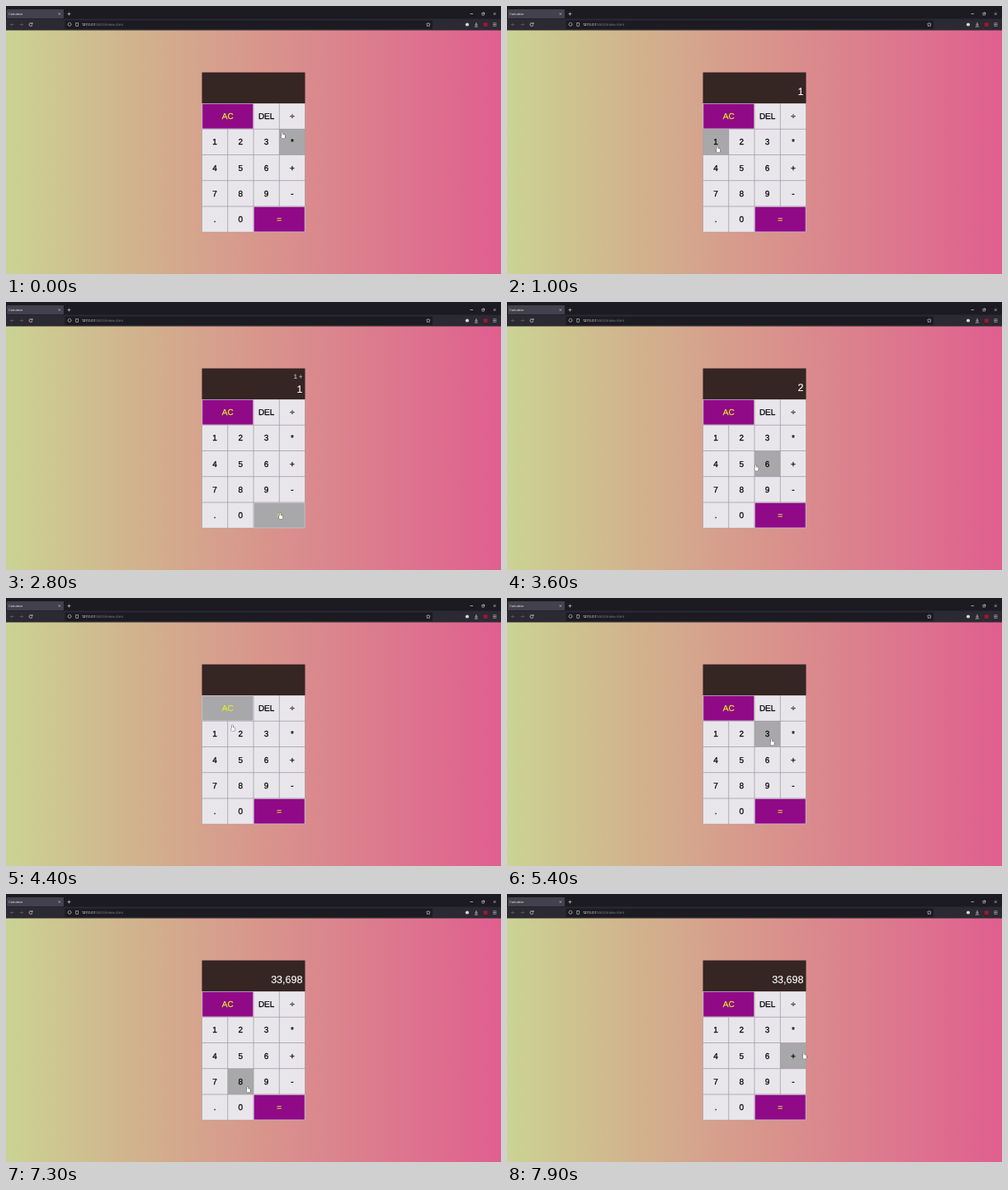
Animation of 600 by 325 pixels, one loop 8000 ms. Source, as an HTML page with a canvas:

```html
<!DOCTYPE html>
<html lang="en">
<head>
<meta charset="utf-8">
<title>Calculator</title>
<style>
html, body { margin: 0; width: 100%; height: 100%; overflow: hidden; }
canvas { display: block; width: 600px; height: 325px; }
</style>
</head>
<body>
<canvas id="stage" width="600" height="325"></canvas>
<script>
const ctx = document.getElementById('stage').getContext('2d');
const LOOP = 8000, STEP = 100;
// The page is a full-size browser window scaled down to the stage
const SCALE = 600 / 1920;
const LEFT = 760 * SCALE, CELL = 100 * SCALE, SCREEN = 120 * SCALE;
const TOP = 80.5, KEYS_TOP = TOP + SCREEN, PAGE_TOP = 29.5;
const UI = 'Inter, "Open Sans", sans-serif';
const ARIAL = '"Liberation Sans", Arial, sans-serif';

const keys = [];
['AADN÷', '123*', '456+', '789-', '.0=='].forEach((row, r) => {
  const labels = r ? [...row] : ['AC', 'AC', 'DEL', '÷'];
  labels.forEach((label, c) => {
    if (labels[c - 1] === label) return;
    const span = labels[c + 1] === label ? 2 : 1;
    keys.push({
      label, accent: span === 2,
      x: LEFT + c * CELL, y: KEYS_TOP + r * CELL, w: span * CELL
    });
  });
});

// Pointer stops, given as an offset from the middle of a key
function hover(time, label, dx = 3, dy = 9) {
  const key = keys.find(k => k.label === label);
  return { time, x: key.x + key.w / 2 + dx, y: key.y + CELL / 2 + dy };
}
const press = (time, label, dx, dy) => ({ ...hover(time, label, dx, dy), label });

const route = [
  hover(0, '*', -11, -8),
  press(1000, '1'),
  hover(1150, '+'),
  press(1400, '+'),
  hover(1900, '1', -15, 15),
  press(2200, '1'),
  hover(2800, '=', 2, 1),
  press(3000, '=', 2, 1),
  press(4200, 'AC'),
  hover(4400, '2', -9, -7),
  hover(5400, '3', 6, 10),
  press(5500, '3', 6, 10),
  press(5700, '3', 6, 10),
  press(6300, '6'),
  hover(6500, '9', -4, 11),
  press(6800, '9', -4, 11),
  press(7200, '8'),
  hover(7450, '9', -10, 11),
  hover(7900, '+', 14, 0)
];

function pointerAt(t) {
  const next = route.find(s => s.time > t);
  if (!next) return route[route.length - 1];
  const from = route[Math.max(0, route.indexOf(next) - 1)];
  const k = Math.max(0, (t - from.time) / (next.time - from.time));
  const ease = k * k * (3 - 2 * k);
  return {
    x: from.x + (next.x - from.x) * ease,
    y: from.y + (next.y - from.y) * ease
  };
}

function calculate(t) {
  let current = '', stored = '';
  for (const { time, label } of route) {
    if (!label || time > t) continue;
    if (label === 'AC') current = stored = '';
    else if (label === '+') [stored, current] = [current, ''];
    else if (label === '=') [current, stored] = [String(+stored + +current), ''];
    else current += label;
  }
  return {
    current: current && Number(current).toLocaleString('en'),
    previous: stored && `${stored} +`
  };
}

function rect(x, y, w, h, color) {
  ctx.fillStyle = color;
  ctx.fillRect(x, y, w, h);
}

// Size in page pixels; weight thickens the glyphs slightly
function text(str, x, y, size, color, align, family = ARIAL, weight = 0) {
  ctx.save();
  ctx.translate(x, y);
  ctx.scale(SCALE, SCALE);
  ctx.font = `${size}px ${family}`;
  ctx.textRendering = 'geometricPrecision';
  ctx.textAlign = align;
  ctx.fillStyle = ctx.strokeStyle = color;
  ctx.lineWidth = weight;
  ctx.lineJoin = 'round';
  ctx.fillText(str, 0, 0);
  if (weight) ctx.strokeText(str, 0, 0);
  const width = ctx.measureText(str).width * SCALE;
  ctx.restore();
  return width;
}

function line(color, width, ...points) {
  ctx.strokeStyle = color;
  ctx.lineWidth = width;
  ctx.beginPath();
  points.forEach(p => ctx.lineTo(...p));
  ctx.stroke();
}

function rounded(x, y, w, h, color) {
  ctx.fillStyle = color;
  ctx.beginPath();
  ctx.roundRect(x, y, w, h, 1);
  ctx.fill();
}

function cross(x, y, r, color) {
  for (const s of [-1, 1]) line(color, 0.6, [x - r, y - r * s], [x + r, y + r * s]);
}

function arc(x, y, r, from, to, color) {
  ctx.strokeStyle = color;
  ctx.lineWidth = 0.7;
  ctx.beginPath();
  ctx.arc(x, y, r, from, to);
  ctx.stroke();
}

function star(x, y, r, color) {
  const points = Array.from({ length: 11 }, (_, i) => {
    const a = -Math.PI / 2 + i * Math.PI / 5, d = i % 2 ? r * 0.5 : r;
    return [x + d * Math.cos(a), y + d * Math.sin(a)];
  });
  line(color, 0.6, ...points);
}

function drawTabs(ink) {
  rect(0, 0, 600, 16, '#1c1b22');
  rounded(1, 4, 69, 11, '#42414d');
  text('Calculator', 3, 10.9, 11.5, '#f4f4f6', 'left', UI);
  cross(64.8, 9.6, 1.2, ink);
  line(ink, 0.7, [74.4, 9.6], [78.4, 9.6]);
  line(ink, 0.7, [76.4, 7.6], [76.4, 11.6]);

  line(ink, 0.7, [562.5, 9.5], [566, 9.5]);
  ctx.lineWidth = 0.6;
  ctx.strokeRect(577, 8.6, 2.4, 2.4);
  line(ink, 0.5, [578, 8], [580, 8], [580, 10]);
  cross(592.3, 9.5, 1.5, ink);
}

function drawToolbar(ink, dim) {
  rect(0, 15.5, 600, PAGE_TOP - 15.5, '#2b2a33');
  for (const [x, s] of [[7.5, 1], [18.5, -1]]) {
    line(dim, 0.7, [x - 2, 22.5], [x + 2, 22.5]);
    line(dim, 0.7, [x - s * 0.3, 20.8], [x - s * 2, 22.5], [x - s * 0.3, 24.2]);
  }
  arc(30, 22.5, 2, 0.2, 5.4, ink);
  line(ink, 0.8, [32, 20], [32, 21.7], [30.3, 21.7]);

  rounded(71.5, 17.5, 445.5, 10.5, '#1c1b22');
  arc(77, 22.2, 2, -0.4, Math.PI + 0.4, ink);
  line(ink, 0.6, [75, 21.3], [77, 20], [79, 21.3]);
  ctx.strokeRect(84.8, 20.3, 2.8, 4.4);
  const host = text('127.0.0.1', 92, 24, 13.5, '#f4f4f6', 'left', UI);
  text(':5500/index.html', 92 + host, 24, 13.5, '#85848d', 'left', UI);
  star(511.8, 22.6, 2.5, ink);

  ctx.fillStyle = ink;
  ctx.beginPath();
  ctx.arc(559, 22.5, 2.1, 0, 7);
  ctx.fill();
  line(ink, 0.8, [570, 20], [570, 23.6]);
  line(ink, 0.7, [568.5, 22.2], [570, 23.7], [571.5, 22.2]);
  line(ink, 0.7, [567.8, 25], [572.2, 25]);
  rect(579, 20.3, 4.6, 4.6, '#a3152c');
  for (let i = -1; i <= 1; i++) {
    line(ink, 0.6, [590.2, 22.5 + i * 1.7], [594.5, 22.5 + i * 1.7]);
  }
}

function drawPage() {
  const g = ctx.createLinearGradient(0, 0, 600, 0);
  ['#cbd393', '#d1b48d', '#d8978c', '#dc7b8e', '#e05f8f'].forEach((color, i) =>
    g.addColorStop(i / 4, color));
  rect(0, PAGE_TOP - 1, 600, 326 - PAGE_TOP, g);
}

// Both lines share the free height of the screen evenly; empty ones take none
function drawScreen({ current, previous }) {
  rect(LEFT, TOP, 4 * CELL, SCREEN, '#352523');
  const pad = 10 * SCALE, right = LEFT + 4 * CELL - pad;
  const lines = [
    { str: previous, size: 24, color: '#d0cac8' },
    { str: current, size: 40, color: '#ffffff' }
  ];
  const height = l => l.str ? l.size * SCALE * 1.15 : 0;
  const free = SCREEN - 2 * pad - height(lines[0]) - height(lines[1]);
  let y = TOP + pad + free / 4;
  for (const l of lines) {
    text(l.str, right, y + l.size * SCALE * 0.92, l.size, l.color, 'right', ARIAL, 0.5);
    y += height(l) + free / 2;
  }
}

function drawKeys(pointer) {
  rect(LEFT, KEYS_TOP, 4 * CELL, 5 * CELL, '#a19ea5');
  for (const { label, accent, x, y, w } of keys) {
    const over = pointer.x >= x && pointer.x < x + w &&
      pointer.y >= y && pointer.y < y + CELL;
    const edge = accent ? 0.7 : 0.4;
    if (accent) rect(x, y, w, CELL, '#d2c6d6');
    rect(x + edge, y + edge, w - 2 * edge, CELL - 2 * edge,
      over ? '#a8a7a9' : accent ? '#900a88' : '#e8e6eb');
    text(label, x + w / 2, y + CELL / 2 + 3.5, 32,
      accent ? '#dcec2c' : '#080808', 'center', ARIAL, 0.9);
  }
}

function drawHand({ x, y }) {
  ctx.save();
  ctx.translate(x, y);
  ctx.beginPath();
  ctx.roundRect(-1.7, -3.8, 1.4, 5, 0.7);
  ctx.roundRect(-2.2, -0.8, 4.4, 4.3, 1.2);
  ctx.lineWidth = 1;
  ctx.strokeStyle = '#45434a';
  ctx.stroke();
  ctx.fillStyle = '#ffffff';
  ctx.fill();
  ctx.restore();
}

function draw(now) {
  const t = Math.floor((now % LOOP) / STEP) * STEP;
  // Highlighting trails the pointer by one step
  const trail = pointerAt(t - STEP);
  drawPage();
  drawTabs('#d6d6da');
  drawToolbar('#d6d6da', '#66656f');
  drawScreen(calculate(t));
  drawKeys({ x: trail.x, y: trail.y - 4 });
  drawHand(pointerAt(t));
}

let start;
function tick(now) {
  start ??= now;
  draw(now - start);
  requestAnimationFrame(tick);
}
draw(0);
requestAnimationFrame(tick);
</script>
</body>
</html>
```
